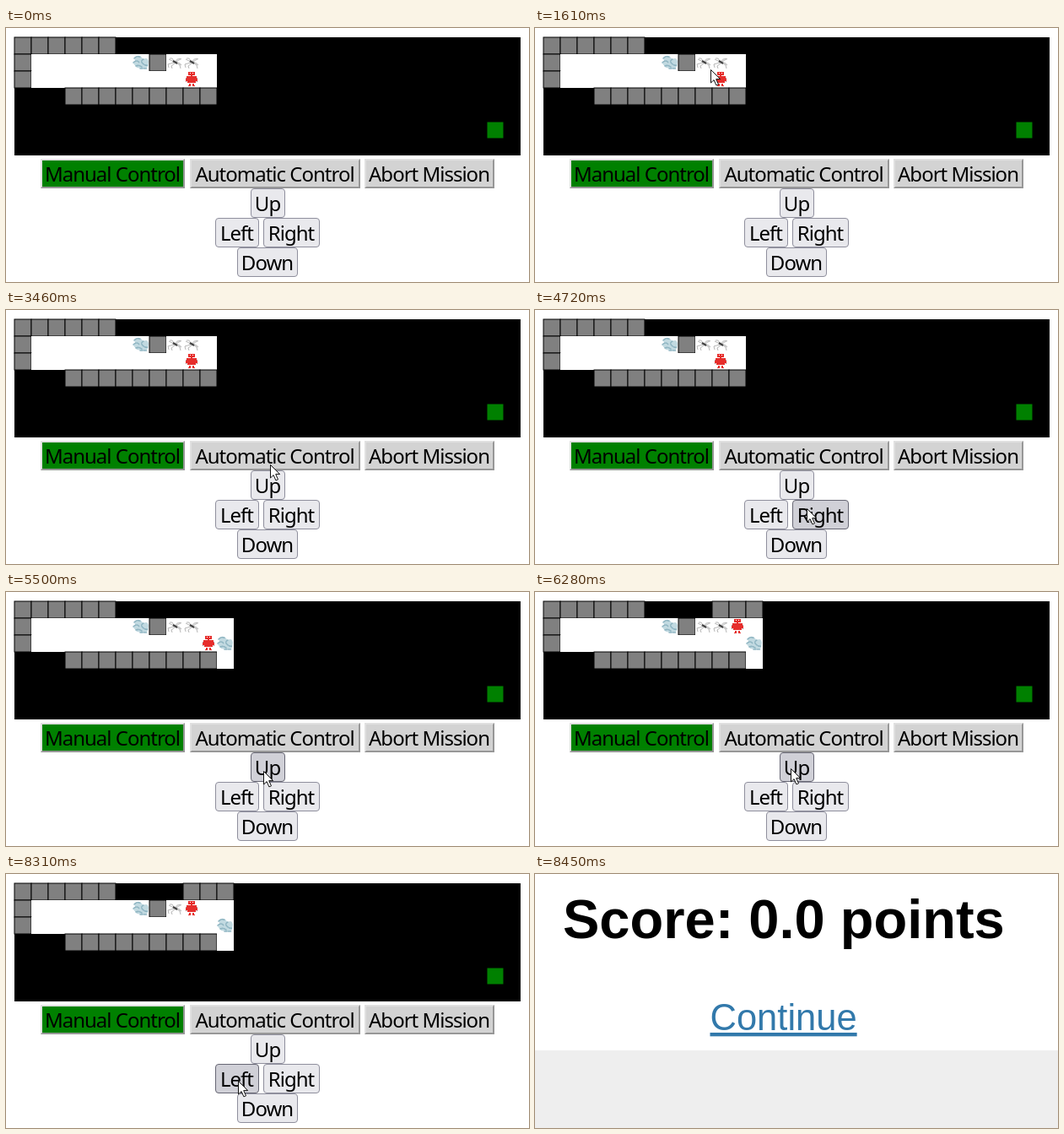
An HTML page that plays this animation: 620x301 px, repeating every 9050 ms.

```html
<!DOCTYPE html>
<html lang="en">
<head>
<meta charset="utf-8">
<title>Robot mission</title>
<style>
html, body { margin: 0; width: 100%; height: 100%; overflow: hidden; background: #fff; }
svg { display: block; }
.label { font: 24px "Noto Sans", sans-serif; letter-spacing: -1px; text-anchor: middle; }
.score { font: bold 65px "Liberation Sans", Arial, sans-serif; }
.link { font: 43.5px "Liberation Sans", Arial, sans-serif; fill: #3279ab; text-decoration: underline; }
</style>
</head>
<body>
<svg width="620" height="301" viewBox="0 0 620 301">
  <defs>
    <rect id="floor" width="20" height="20" fill="#fff"/>
    <rect id="wall" width="20" height="20" fill="#808080" stroke="#000"/>
    <rect id="goal" width="20" height="20" fill="#008000" stroke="#000"/>
    <g id="wind" fill="none" stroke="#8fb5c2" stroke-linecap="round">
      <path d="M2 4q4-4 8-1l3 3q5-3 6 3l-1 6q-3 3-7 2l-6-1-4-5 2-3z" fill="#c2dae1" stroke="none"/>
      <path d="M2 5q4-4 8-1M1 10q4-4 7 0M4 14q4-2 8 2M13 6q-4 2-1 5t6 2M9 17h8" stroke-width="1.6" stroke-dasharray="3 1.6"/>
    </g>
    <g id="mosquito" fill="none" stroke="#999" stroke-width=".7">
      <path d="M9 9L3 6M9 10L2 12 3 16M10 11L6 14 7 17M12 10l4 3 1 4M11 9l5-4 2 1M9 8L7 5 4 5"/>
      <path d="M10 10q2-6 7-4zM10 10q6-1 8 3z" fill="#ddd" stroke="#bbb"/>
      <path d="M8 8l5 3" stroke="#444" stroke-width="2.2"/>
    </g>
  </defs>

  <g id="game">
    <path d="M10 11h600v140H10z"/>
    <g id="north"></g>
    <g id="map"></g>
    <g id="east"></g>
    <g id="robot">
      <path d="M0 0h20v19H0z" fill="#fff"/>
      <path d="M3.5 8v6M16.5 8v6" stroke="#999" stroke-dasharray="2 1"/>
      <path d="M6 1h8v4h-3v1h5v3h1v3h-2v2H5v-2H3V9h1V6h5V5H6zM7 15h2v2H7zM11 15h2v2h-2zM6 17h3v1H6zM11 17h3v1h-3z" fill="#e62e2c"/>
      <path d="M8 2.5h1M11 2.5h1" stroke="#fff"/>
    </g>
    <g id="buttons"></g>
    <circle id="ring" r="12.5" fill="#e6dc32" opacity=".72"/>
    <path id="cursor" d="M.5.5v15.5l3.6-3.4 2.8 6.3 2.6-1.1-2.8-6.2h5z" fill="#fff" stroke="#111"/>
  </g>

  <g id="result">
    <path d="M0 209h620v92H0z" fill="#eee"/>
    <text class="score" x="33" y="76">Score: 0.0 points</text>
    <text class="link" x="207.5" y="185">Continue</text>
  </g>
</svg>
<script>
const LOOP = 9050, CELL = 20;
const $ = id => document.getElementById(id);

function add(parent, tag, attrs, text = "") {
  const el = document.createElementNS("http://www.w3.org/2000/svg", tag);
  for (const name in attrs) el.setAttribute(name, attrs[name]);
  el.textContent = text;
  return parent.appendChild(el);
}
const place = (el, x, y) => el.setAttribute("transform", `translate(${x} ${y})`);
const show = (el, on) => el.setAttribute("visibility", on ? "visible" : "hidden");

// A horizontal run of equal tiles, in cell coordinates
function tiles(layer, kind, col, row, count = 1) {
  for (let i = 0; i < count; i++)
    add($(layer), "use", { href: "#" + kind, x: 10 + (col + i) * CELL, y: 11 + row * CELL });
}
// Rows go from top to bottom, so that floors cover the wall outlines above them
tiles("north", "wall", 10, 0, 3);
tiles("map", "wall", 0, 0, 6);
tiles("map", "wall", 0, 1);
tiles("map", "floor", 1, 1, 7);
tiles("map", "wind", 7, 1);
tiles("map", "wall", 8, 1);
tiles("map", "floor", 9, 1, 3);
tiles("map", "mosquito", 9, 1, 2);
tiles("map", "wall", 0, 2);
tiles("map", "floor", 1, 2, 11);
tiles("map", "wall", 3, 3, 9);
tiles("map", "goal", 28, 5);
for (const row of [1, 2, 3]) tiles("east", "floor", 12, row);
tiles("east", "wind", 12, 2);

function label(text, x, y, w) {
  add($("buttons"), "text", { class: "label", x: x + w / 2 - .5, y: y + 27 }, text);
}
function modeButton(text, x, w, fill) {
  const y = 155, h = 35;
  add($("buttons"), "rect", { x, y, width: w, height: h, fill: "#979797" });
  add($("buttons"), "path", { d: `M${x} ${y + h}V${y}h${w}l-2 2L${x + 2} ${y + h - 2}z`, fill: "#e0e0e0" });
  add($("buttons"), "rect", { x: x + 2, y: y + 2, width: w - 4, height: h - 4, fill });
  label(text, x, y, w);
}
function moveButton(text, x, y, w) {
  const box = add($("buttons"), "rect", { x: x + .5, y: y + .5, width: w - 1, height: 34, rx: 3.5 });
  label(text, x, y, w);
  return { box, x, y, w, h: 35 };
}
modeButton("Manual Control", 41, 171, "#008000");
modeButton("Automatic Control", 218, 202, "#d3d3d3");
modeButton("Abort Mission", 425, 154, "#d3d3d3");
const moveButtons = [
  moveButton("Up", 290, 190, 41),
  moveButton("Left", 248, 225, 52),
  moveButton("Right", 305, 225, 67),
  moveButton("Down", 274, 260, 72),
];

// Pointer moves: first step, last step, number of steps, destination
const moves = [
  [620, 840, 4, 110, 160], [990, 1070, 2, 150, 125], [1300, 1760, 7, 213, 42],
  [2230, 2390, 3, 197, 45], [2540, 2620, 2, 180, 48], [2770, 2850, 2, 205, 55],
  [3000, 3080, 2, 228, 62], [3310, 3610, 5, 329, 206], [3780, 3870, 2, 312, 212],
  [4400, 4720, 5, 322, 235], [5420, 5580, 3, 303, 209], [6520, 6740, 4, 275, 245],
];
const presses = [[4870, 4960], [5810, 5960], [7530, 7670]];
const robotPath = [[0, 10, 2], [5270, 11, 2], [6280, 11, 1], [8310, 10, 1]];

function pointerAt(t) {
  let x = 20, y = 170;
  for (const [start, end, steps, toX, toY] of moves) {
    if (t < start) break;
    const step = Math.floor((t - start) / (end - start) * (steps - 1) + .001);
    const ease = 1 - (1 - Math.min(1, (step + 1) / steps)) ** 2;
    x += (toX - x) * ease;
    y += (toY - y) * ease;
  }
  return [Math.round(x), Math.round(y)];
}

function draw(t) {
  const over = t >= 8450;
  $("game").style.display = over ? "none" : "";
  $("result").style.display = over ? "" : "none";

  const [, col, row] = robotPath.findLast(([start]) => t >= start);
  place($("robot"), 10 + col * CELL, 11 + row * CELL);
  show($("east"), t >= 5270);
  show($("north"), t >= 6280);

  const visible = t >= 620;
  const [x, y] = pointerAt(t);
  const pressed = presses.some(([down, up]) => t >= down && t < up);
  place($("cursor"), x, y);
  place($("ring"), x, y);
  show($("cursor"), visible);
  show($("ring"), pressed);
  for (const b of moveButtons) {
    const hover = visible && x >= b.x && x < b.x + b.w && y >= b.y && y < b.y + b.h;
    b.box.setAttribute("fill", !hover ? "#e9e9ed" : pressed ? "#b1b1b9" : "#d0d0d7");
    b.box.setAttribute("stroke", !hover ? "#8f8f9d" : pressed ? "#484851" : "#676774");
  }
}

function frame() {
  draw(performance.now() % LOOP);
  requestAnimationFrame(frame);
}
frame();
</script>
</body>
</html>
```
